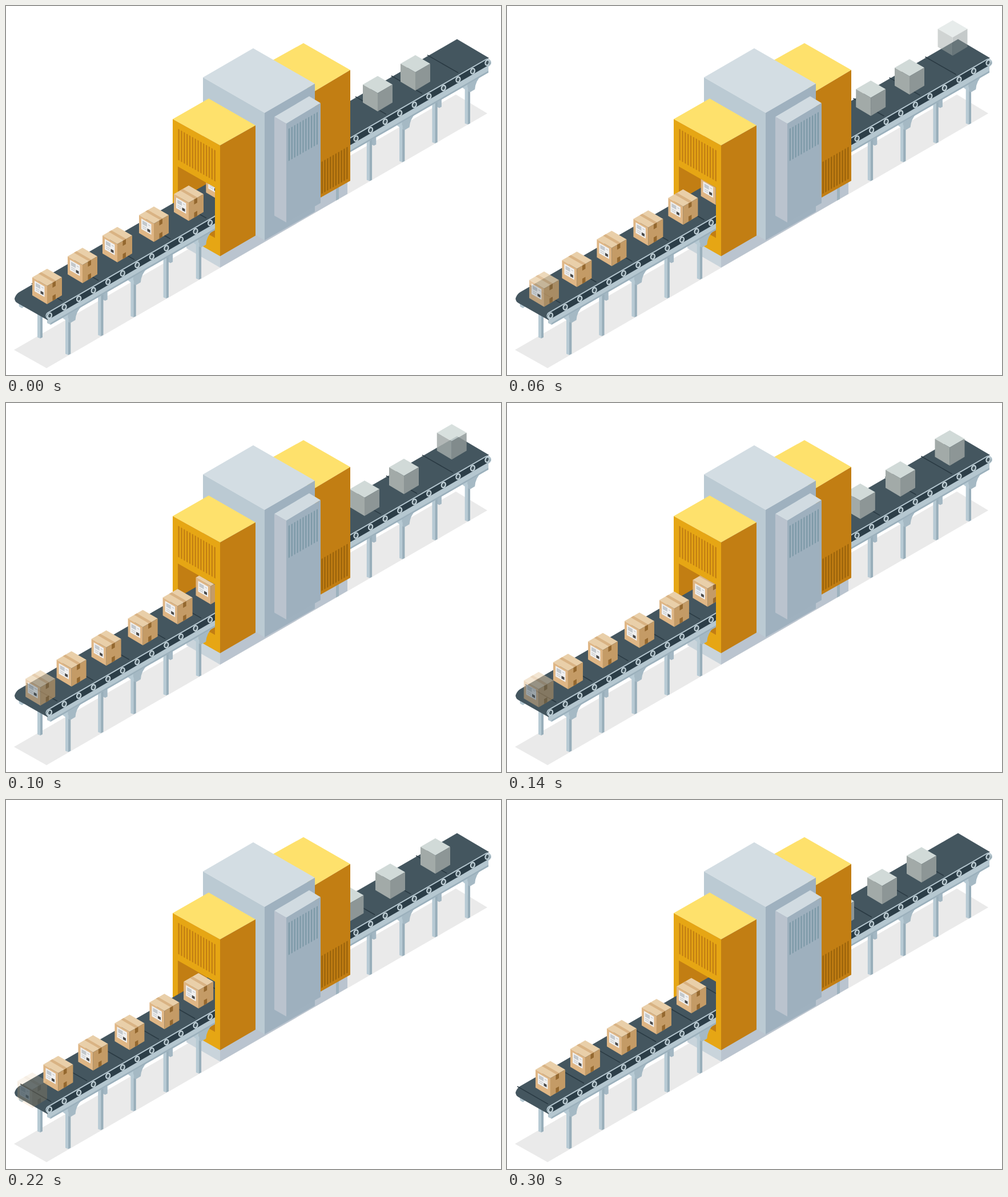
These frames come from a looping animation (867x646 px, 0.32 s). An HTML page:

```html
<!DOCTYPE html>
<html lang="en">
<head>
<meta charset="utf-8">
<title>Packing line</title>
<style>
  html, body { margin: 0; width: 100%; height: 100%; overflow: hidden; background: #fff; }
  svg { display: block; width: 867px; height: 646px; }
</style>
</head>
<body>
<svg id="stage" viewBox="0 0 867 646" xmlns="http://www.w3.org/2000/svg">
  <defs>
    <clipPath id="open">
      <path d="M0 0H301V281L366 318V646H0ZM603 0H867V646H603Z"/>
    </clipPath>
    <g id="carton">
      <path fill="#e9cfa9" d="M0 0L26 15L0 30L-26 15Z"/>
      <path fill="#dfb685" d="M-26 15L0 30V62L-26 46.5Z"/>
      <path fill="#c49b66" d="M26 15L0 30V62L26 46.5Z"/>
      <path fill="#d9b384" d="M-15 8.7L-10.5 6L15.5 21L11 23.6Z"/>
      <path fill="#94682f" d="M9.5 24.5L15 21.3V30L9.5 33.2ZM9.5 47.5L15 44.3V53L9.5 56.2Z"/>
      <path fill="#f0f0f0" d="M-22 21L-4.5 31V49.5L-22 39.5Z"/>
      <path fill="#c3c8cc" d="M-20 24.5L-12 29V35.5L-20 31Z"/>
      <path stroke="#b9bec3" stroke-width="1" d="M-20 34L-13 38M-20 37L-13 41M-10 32L-6.5 34"/>
      <path fill="#4a4a4a" d="M-11.5 38.5L-6.5 41.3V46L-11.5 43.2Z"/>
    </g>
    <g id="block">
      <path fill="#d1dad8" d="M0 0L26 15L0 30L-26 15Z"/>
      <path fill="#a2aaa8" d="M-26 15L0 30V62L-26 46.5Z"/>
      <path fill="#8d9696" d="M26 15L0 30V62L26 46.5Z"/>
    </g>
  </defs>

  <path fill="#eaeaea" d="M14 602L71 634L843 188L788 155Z"/>

  <!-- machine -->
  <path fill="#c9d4db" d="M316 404V424L375 458V436Z"/>
  <path fill="#bac4cf" d="M375 436L598 305V329L375 458Z"/>
  <path fill="#9db2be" d="M578 316H583V338L578 340.5Z"/>

  <path fill="#fee16c" d="M521 65L603 112L541 149L440 110Z"/>
  <path fill="#c27e13" d="M603 112V306L541 341V149Z"/>
  <g id="ventBack" fill="#9a630b"></g>

  <path fill="#d3dde3" d="M433 74L541 136L453 187L345 125Z"/>
  <path fill="#bbcad3" d="M345 125L453 187V410L345 348Z"/>
  <path fill="#9fb1bf" d="M453 187L541 136V360L453 410Z"/>

  <path fill="#d1dbe1" d="M531 158L551 170L491 206L470 194Z"/>
  <path fill="#bac3ce" d="M470 194L491 206V379L470 367Z"/>
  <path fill="#9eb0be" d="M491 206L551 170V345L491 379Z"/>
  <g id="ventPanel" fill="#7c99a7"></g>

  <path fill="#fee16c" d="M355 162L437 209L375 244L292 198Z"/>
  <path fill="#e6a614" d="M292 198L375 244V438L292 391Z"/>
  <path fill="#c27e13" d="M375 244L437 209V402L375 438Z"/>
  <path fill="#c27e13" d="M301 281L366 318V406L301 369Z"/>
  <g id="ventFront" fill="#c27e13"></g>

  <!-- conveyor -->
  <g clip-path="url(#open)">
    <g id="legs"></g>
    <path fill="#b5c7d0" d="M72 550L845 104V116.500L78 558L72 555Z"/>
    <path fill="#9bb0bc" d="M78 555L845 113.500V116.500L78 558Z"/>
    <path fill="#44565f" d="M790 58L846 91L78 535L73 550L20 520Q15 517 15 512Q17 505 23 501Z"/>
    <g id="seams" stroke="#2a3a43" stroke-width="1.6"></g>
    <path stroke="#b5c7d0" stroke-width="14" stroke-linecap="round" d="M76.500 542L843 99.200"/>
    <path stroke="#2c3e48" stroke-width="10" stroke-linecap="round" d="M76.500 542L843 99.200"/>
    <g id="rollers" fill="#44565f" stroke="#c3d3da" stroke-width="2.2"></g>
    <g id="items"></g>
  </g>
</svg>
<script>
const NS = "http://www.w3.org/2000/svg";
const STEP = 20, COUNT = 16, SLOPE = 0.577;
const $ = id => document.getElementById(id);

function add(parent, tag, attrs) {
  const el = document.createElementNS(NS, tag);
  for (const key in attrs) el.setAttribute(key, attrs[key]);
  parent.appendChild(el);
  return el;
}

// A row of upright slats, skewed along an isometric axis
function vent(id, count, x, y, dx, slope, width, height) {
  for (let i = 0; i < count; i++) {
    const px = x + i * dx, py = y + i * dx * slope;
    add($(id), "path", {
      d: `M${px} ${py}l${width} ${width * slope}v${height}l${-width} ${-width * slope}z`
    });
  }
}
vent("ventFront", 14, 301.5, 215, 4.85, SLOPE, 2.3, 54.5);
vent("ventPanel", 11, 494.8, 215, 4.9, -SLOPE, 2.2, 56.5);
vent("ventBack", 10, 552.5, 273, 4.85, -SLOPE, 2.3, 56);

function leg(x, bottom, braced) {
  const top = 114 + (843 - x) * SLOPE;
  const g = add($("legs"), "g", { transform: `translate(${x} ${top})` });
  const h = bottom - top;
  if (!braced) {
    add(g, "path", { fill: "#a3b7c3", d: `M4 -10H12V${h - 64}L8 ${h - 62}L4 ${h - 64}Z` });
  }
  add(g, "path", { fill: "#b7cad4", d: `M-4.500 -6H0.500V${h}L-4.500 ${h - 2}Z` });
  add(g, "path", { fill: "#98aeba", d: `M0.500 -6H4.800V${h - 2}L0.500 ${h}Z` });
  if (braced) {
    add(g, "path", { fill: "#a5b9c4", d: "M0 0L25 -13Q14 -3 13 12L4.500 17L0 15Z" });
    add(g, "path", { fill: "#b7cad4", d: "M-14 5L-9 2L1 9V16Z" });
  }
}
add($("legs"), "path", { fill: "#b7cad4", d: "M55 535H60V582L55 580Z" });
add($("legs"), "path", { fill: "#98aeba", d: "M60 535H64V580L60 582Z" });
add($("legs"), "path", { fill: "#b7cad4", d: "M22 520L32 526L28 529L23 526Z" });
for (let i = 0; i < 5; i++) leg(108.5 + 57.2 * i, 611 - 33 * i, i % 2 === 0);
for (let i = 1; i < 5; i++) leg(579 + 57.3 * i, 339.5 - 33 * i, i % 2 === 0);

for (let i = 0; i <= 30; i++) {
  add($("rollers"), "ellipse", {
    cx: 76.5 + 25.55 * i, cy: 542 - 14.76 * i, rx: 3.4, ry: 4.6,
    transform: `rotate(18 ${76.5 + 25.55 * i} ${542 - 14.76 * i})`
  });
}
for (let i = 0; i < 12; i++) {
  const x = 739 - 63 * i;
  const y = 58 + (790 - x) * SLOPE;
  add($("seams"), "path", { d: `M${x - 1} ${y - 1.5}L${x + 53} ${y + 29.5}` });
}

// Start position and travel per step
const movers = [
  { kind: "block", x: 717, y: 86, dx: -4, dy: 2.3 },
  { kind: "block", x: 651, y: 122.5, dx: -4.6, dy: 2.65 },
  { kind: "carton", x: 376.3, y: 280, dx: -3.56, dy: 2.1 },
  { kind: "carton", x: 320, y: 314.3, dx: -3.87, dy: 2.26 },
  { kind: "carton", x: 259, y: 351, dx: -3.87, dy: 2.26 },
  { kind: "carton", x: 195, y: 386.8, dx: -3.87, dy: 2.26 },
  { kind: "carton", x: 134, y: 423.2, dx: -3.87, dy: 2.26 },
  { kind: "carton", x: 72, y: 460, dx: -2.36, dy: 1.55, fade: 14 }
];
// Step, x, y of the block that lands on the belt
const landing = [
  [0, 779, 7], [2, 780, 19], [4, 781, 31], [6, 780.5, 43],
  [7, 775.5, 47.7], [9, 764.5, 58], [11, 752, 67], [15, 726, 82.5]
];
const dropped = add($("items"), "use", { href: "#block" });
for (const m of movers) m.el = add($("items"), "use", { href: "#" + m.kind });

function place(el, x, y, opacity) {
  el.setAttribute("transform", `translate(${x} ${y})`);
  el.setAttribute("opacity", Math.max(0, Math.min(1, opacity)));
}

function pointAt(path, n) {
  let i = 1;
  while (i < path.length - 1 && path[i][0] < n) i++;
  const [t0, x0, y0] = path[i - 1], [t1, x1, y1] = path[i];
  const k = (n - t0) / (t1 - t0);
  return [x0 + (x1 - x0) * k, y0 + (y1 - y0) * k];
}

function draw(time) {
  const n = Math.floor(time / STEP) % COUNT;
  for (const m of movers) {
    place(m.el, m.x + m.dx * n, m.y + m.dy * n, m.fade ? 1 - n / m.fade : 1);
  }
  const [x, y] = pointAt(landing, n);
  place(dropped, x, y, n / 6);
  const shift = 1.8 * n;
  $("seams").setAttribute("transform", `translate(${-shift} ${shift * SLOPE})`);
}

const start = performance.now();
function tick() {
  draw(performance.now() - start);
  requestAnimationFrame(tick);
}
tick();
</script>
</body>
</html>
```
